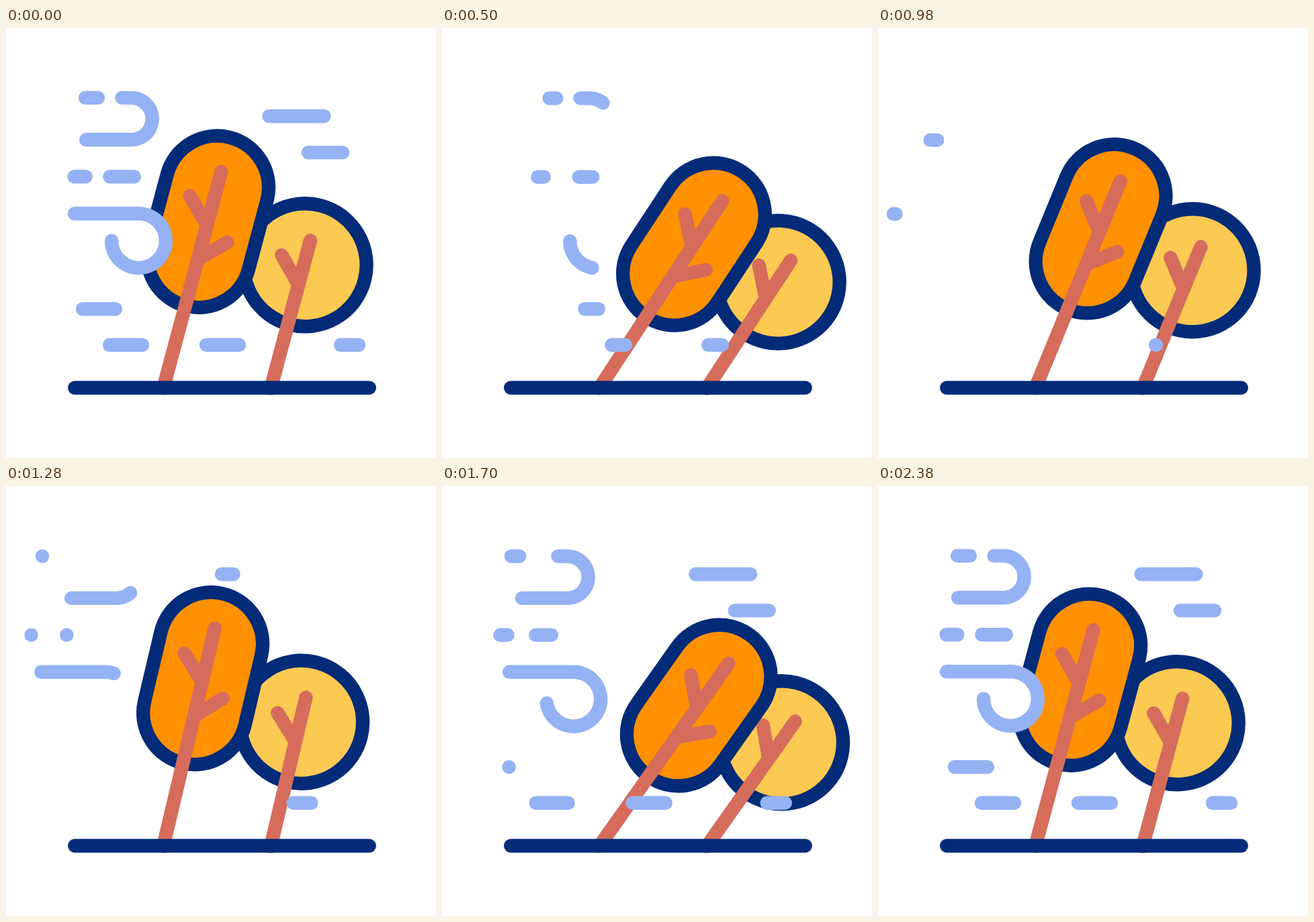
An HTML page that plays this animation: 640x640 px, repeating every 2.4 s.

```html
<!DOCTYPE html>
<html lang="en">
<head>
<meta charset="utf-8">
<title>Windy trees</title>
<style>
  html, body { margin: 0; width: 100%; height: 100%; overflow: hidden; background: #fff; }
  svg { display: block; width: 100%; height: 100%; }
  .wood { fill: none; stroke: #d66c5c; }
  .leaf { stroke: #032b78; }
  .wind { fill: #fff; stroke: #94b2f4; }
</style>
</head>
<body>
<svg viewBox="0 0 640 640" stroke-width="20.4" stroke-linecap="round" stroke-linejoin="round">
  <g id="round">
    <circle class="leaf" cx="1.8" cy="-190.5" r="91.5" fill="#fcc952"/>
    <path class="wood" d="M0 0V-227.8M0-160L-35.6-195.6"/>
  </g>
  <g id="tall">
    <rect class="leaf" x="-76.8" y="-386" width="153.6" height="259" rx="76.8" fill="#ff9000"/>
    <path class="wood" d="M0 0V-333.2M0-251L-35.6-286.6M0-198.5L35.8-234.3"/>
  </g>
  <path class="leaf" d="M102.3 535.5H540.7"/>
  <g id="air"></g>
</svg>
<script>
const LOOP = 2400, CALM = 800;
const $ = id => document.getElementById(id);

// smooth 0..1 ramp that starts at a time and lasts a span
function ramp(t, start, span) {
  const u = Math.min(1, Math.max(0, (t - start) / span));
  return u * u * (3 - 2 * u);
}

// lean of the trees: [time, degrees]
const lean = [[0, 15], [700, 37.8], [1200, 11.7], [1710, 35.3], [LOOP, 15]];

function angle(t) {
  const i = lean.findIndex(k => k[0] > t);
  const [t0, a0] = lean[i - 1], [t1, a1] = lean[i];
  return a0 + (a1 - a0) * ramp(t, t0, t1 - t0);
}

function newPath(d, parent) {
  const el = document.createElementNS("http://www.w3.org/2000/svg", "path");
  el.setAttribute("d", d);
  if (parent) parent.append(el);
  return el;
}

// Each gust drifts away while erased from its tail, then drifts back while drawn.
// erase, move and draw are [start, span].
const gusts = [];
function gust(d, opts) {
  const shape = newPath(d);
  const el = newPath("", $("air"));
  el.setAttribute("class", "wind");
  gusts.push({ shape, el, len: shape.getTotalLength(), ...opts });
}

function curl(d, back, start) {
  const come = [start, 850];
  gust(d, { away: 41.5, back, bob: 0.6, erase: [0, 700], move: come, draw: come });
}
curl("M119 166.3H186.5A31.2 31.2 0 0 0 186.5 103.9H172.5", 44, 855);
curl("M102 276.2H197.5A40.4 40.4 0 1 1 157.1 316.6", 80, 925);

function dash(x, y, len) {
  gust(`M${x} ${y}h${len}`, { away: 41.5, back: 72.5, bob: 0.6,
    erase: [340, 350], move: [1100, 850], draw: [1250, 750] });
}
dash(118, 103.9, 19);
dash(101.6, 221.2, 17);
dash(154.3, 221.2, 36.5);

// streaks on the left are erased later than those on the right
function streak(x, y, len, start) {
  gust(`M${x} ${y}h${len}`, { away: 87, back: 85, bob: 0,
    erase: [x < 320 ? 340 : 0, 290], move: [1050, 880], draw: [start, 340] });
}
streak(114, 418.2, 49, 1690);
streak(154, 471.8, 49, 1390);
streak(298, 471.8, 49, 1300);
streak(498, 471.8, 27, 940);
streak(391.5, 131.3, 82, 1180);
streak(450, 185.4, 51, 1300);

// the part of a path between two lengths, as a polyline
function slice(shape, from, to) {
  const n = Math.ceil((to - from) / 4);
  let d = "";
  for (let i = 0; i <= n; i++) {
    const p = shape.getPointAtLength(from + (to - from) * i / n);
    d += `${i ? "L" : "M"}${p.x} ${p.y}`;
  }
  return d;
}

function blow(g, t) {
  const leaving = t < CALM;
  const from = leaving ? g.len * ramp(t, ...g.erase) : 0;
  const to = leaving ? g.len : g.len * ramp(t, ...g.draw);
  const dx = leaving ? g.away * ramp(t, 0, 700) : g.back * (ramp(t, ...g.move) - 1);
  const dy = g.bob * (ramp(t, 0, 300) - ramp(t, LOOP - 300, 300));
  g.el.setAttribute("d", to - from > 0.02 ? slice(g.shape, from, to) : "");
  g.el.setAttribute("transform", `translate(${dx} ${dy})`);
}

function render(now) {
  const t = now % LOOP, a = angle(t);
  $("tall").setAttribute("transform", `translate(234.1 536) rotate(${a})`);
  $("round").setAttribute("transform", `translate(394 536.3) rotate(${a})`);
  gusts.forEach(g => blow(g, t));
}

const begin = performance.now();
function tick() {
  render(performance.now() - begin);
  requestAnimationFrame(tick);
}
tick();
</script>
</body>
</html>
```
